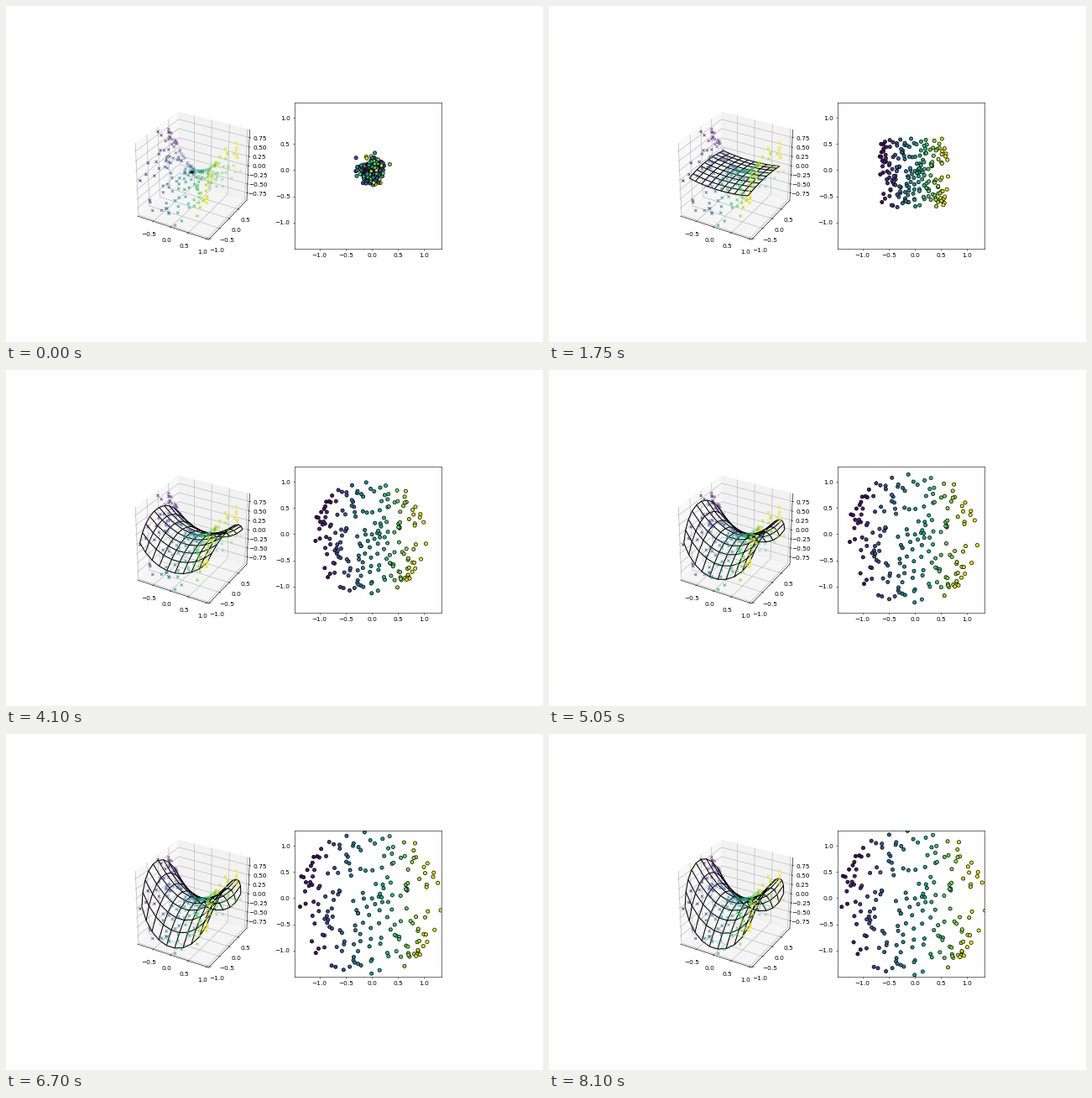
A matplotlib script that plays this animation: 640x400 px, repeating every 8.15 s.

```python
import numpy as np
import matplotlib.pyplot as plt
from matplotlib.animation import FuncAnimation

FRAMES, INTERVAL = 163, 50
N, GRID = 200, 10

plt.rcParams.update({"font.family": "DejaVu Sans", "font.size": 10.7})

# Evenly spread saddle samples and a small random latent start
rng = np.random.RandomState(4)
a = rng.permutation(np.linspace(-0.97, 1, N))
b = rng.permutation(np.linspace(-1, 0.97, N))
data = np.array([a, b, a**2 - b**2])
start = rng.normal(0, 0.12, (N, 2))
wobble = rng.normal(0, 0.022, (N, 2))
u, v = np.meshgrid(*[np.linspace(-1, 1, GRID)] * 2)


def settle(t, tau):
    return 1 - np.exp(-t / tau)


def fold(t):
    """Slow second phase, in which the sheet bends."""
    return 1 / (1 + np.exp(-(t - 3.75) / 0.95))


def latent(t):
    """A jumble that unfolds to a square, then swells to a disk."""
    size = 0.61 * settle(t, 0.6) + 0.82 * fold(t)
    bend = min(1, 2.2 * fold(t))
    disk = np.column_stack([a * np.sqrt(1 - bend * b**2 / 2),
                            b * np.sqrt(1 - bend * a**2 / 2)])
    return size * (disk + wobble - [0.05, 0.065]) + (1 - settle(t, 0.6)) * start


def surface(t):
    """A sheet that spreads first, then bends into a saddle with soft corners."""
    reach = 1.05 * settle(t + 0.05, 1.15)
    lift = 0.78 * fold(t) * settle(t + 0.05, 0.8)
    soft = 1 - 0.15 * fold(t) * u**2 * v**2
    return reach * u * soft, reach * v * soft, lift * (u**2 - v**2)


def box(left, top, right, bottom):
    return [left / 640, 1 - bottom / 400, (right - left) / 640, (bottom - top) / 400]


fig = plt.figure(figsize=(12.8, 8), dpi=50, facecolor="white")

space = fig.add_axes(box(138.3, 119, 303.1, 283.8), projection="3d")
space.patch.set_visible(False)
space.set_box_aspect((1, 1, 1))
space.view_init(elev=30, azim=-60)
space.set(xlim=(-0.97, 1.06), ylim=(-1.05, 0.99), zlim=(-0.96, 0.95))
space.set_xticks([-0.5, 0, 0.5, 1])
space.set_yticks([-1, -0.5, 0, 0.5])
space.set_zticks(np.arange(-0.75, 0.8, 0.25))
space.tick_params(pad=4.2)
space.scatter(*data, c=a, marker="x")

plane = fig.add_axes(box(343.5, 114.7, 519.3, 288.7))
plane.set(xlim=(-1.482, 1.335), ylim=(-1.494, 1.295))
plane.set_xticks([-1, -0.5, 0, 0.5, 1])
plane.set_yticks([-1, -0.5, 0, 0.5, 1])
dots = plane.scatter(*latent(0).T, c=a, edgecolors="k")

wires = []


def update(i):
    t = i * INTERVAL / 1000
    dots.set_offsets(latent(t))
    while wires:
        wires.pop().remove()
    wires.append(space.plot_wireframe(*surface(t), color="black"))
    return [dots, *wires]


ani = FuncAnimation(fig, update, frames=FRAMES, interval=INTERVAL,
                    repeat=True, repeat_delay=0, blit=False)
plt.show()
```
